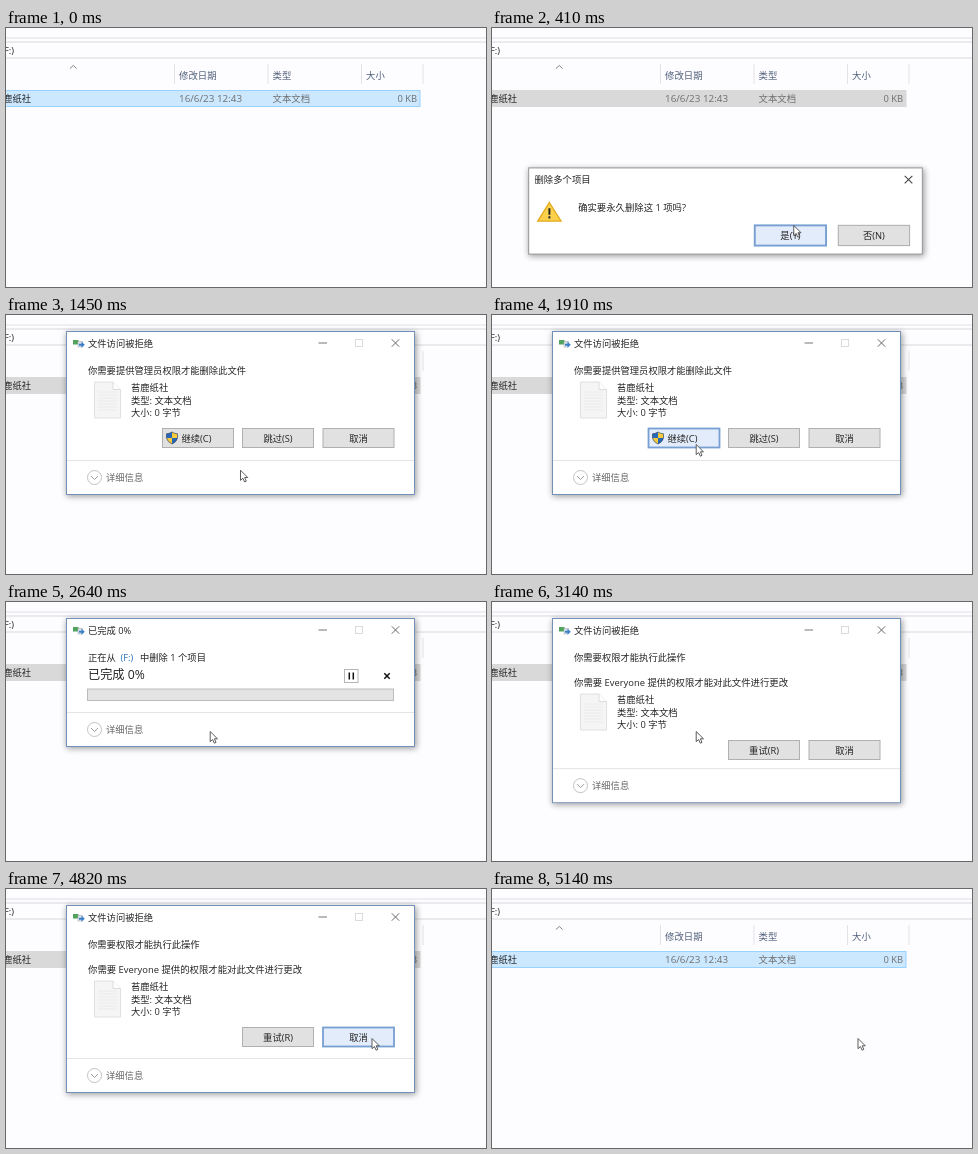
Write an HTML page that moves like this. It is 480x259 px and loops after 5.19 s.

```html
<!DOCTYPE html>
<html lang="zh-CN">
<head>
<meta charset="utf-8">
<title>删除文件</title>
<style>
html, body { margin: 0; width: 100%; height: 100%; overflow: hidden; background: #fdfcff; }
#stage { display: block; width: 100vw; height: 100vh; }
text { font-family: "Open Sans", "Noto Sans CJK SC", "Noto Sans CJK", sans-serif; white-space: pre; }
.client { overflow: hidden; }
</style>
</head>
<body>
<svg id="stage" viewBox="0 0 480 259"></svg>
<script>
const LOOP = 5190;
const FILE_NAME = '苔鹿纸社';
const INK = '#242424';
const TOP = 16.5;

const text = (x, y, content, { size = 9.3, fill = INK, anchor = 'start' } = {}) =>
  `<text x="${x}" y="${y}" font-size="${size}" fill="${fill}" text-anchor="${anchor}">${content}</text>`;

const rect = (x, y, w, h, fill, stroke = 'none', extra = '') =>
  `<rect x="${x}" y="${y}" width="${w}" height="${h}" fill="${fill}" stroke="${stroke}" ${extra}/>`;

const path = (d, stroke, width = 1, fill = 'none') =>
  `<path d="${d}" fill="${fill}" stroke="${stroke}" stroke-width="${width}"/>`;

const cross = (x, y, r, stroke, width) =>
  path(`M${x - r} ${y - r}l${2 * r} ${2 * r}m0 ${-2 * r}l${-2 * r} ${2 * r}`, stroke, width);

const button = (x, y, w, h, label, size, labelX = x + w / 2) =>
  `<g class="button" data-box="${x},${y},${w},${h}">${rect(x, y, w, h, '#e1e1e1', '#b0b0b0')}` +
  text(labelX, y + h / 2 + 3.6, label, { size, anchor: 'middle' }) + '</g>';

const panel = (x, y, w, h, border) =>
  rect(x, y + 1, w + 2, h + 1, '#000', 'none', 'class="shade" opacity=".38" filter="url(#blur)"') +
  rect(x, y, w, h, '#fff', border, 'class="frame"');

const shield = (x, y) => `<g transform="translate(${x} ${y})">` +
  path('M0-6Q-2.6-4.3-5.5-4.2V0H0ZM5.5 0Q4.6 4 0 6V0Z', 'none', 0, '#2767b5') +
  path('M0-6Q2.6-4.3 5.5-4.2V0H0ZM-5.5 0Q-4.6 4 0 6V0Z', 'none', 0, '#f7cb3c') +
  path('M0-6Q2.6-4.3 5.5-4.2V0Q4.6 4 0 6Q-4.6 4-5.5 0V-4.2Q-2.6-4.3 0-6Z', '#34496a', .7) + '</g>';

const pageIcon = y => path(`M88.5 ${y}h18.5l7.5 7.5v28.5h-26z`, '#e0e0e0', 1, '#f5f5f5') +
  path(`M107 ${y}v7.5h7.5`, '#dcdcdc', 1, '#fff') +
  path([10, 13, 16, 19, 22, 25, 28].map(d => `M92 ${y + d}h19`).join(''), '#e9e9e9', .8);

const fileInfo = y => pageIcon(y) +
  text(125, y + 9.3, FILE_NAME) +
  text(125, y + 21.7, '类型: 文本文档') +
  text(125, y + 33.7, '大小: 0 字节');

// The footer is drawn at y = 0 and moved with the window height.
const footer = '<g class="footer">' + rect(61, 0, 347, 34, '#fff') + path('M61 0H408', '#e4e4e4') +
  '<circle cx="88.5" cy="17" r="7" fill="#fff" stroke="#b4b4b4" stroke-width=".8"/>' +
  path('M85 15.5l3.5 3.5 3.5-3.5', '#909090', .9) +
  text(100, 20.5, '详细信息', { fill: '#666' }) + '</g>';

const taskWindow = (title, content) => panel(60.5, TOP, 348, 0, '#7290b8') +
  '<svg class="client" width="480">' +
  rect(67, 25, 5.5, 4.5, '#4fa35a') +
  rect(72, 26.5, 4.5, 5.5, '#dfe4ea', '#a3aebb', 'stroke-width=".6"') +
  path('M73 28.7h2.5v-2l3.3 3-3.3 3v-2H73z', 'none', 0, '#3b80c6') +
  text(82, 31.5, title) +
  path('M312.5 28h8.5', '#777') +
  rect(349.5, 24.5, 7, 7, 'none', '#d8d8d8', 'stroke-width=".9"') +
  cross(389.5, 28, 3.7, '#666', 1) +
  content + footer + '</svg>';

const confirmDialog = panel(48.5, 142.5, 370, 81, '#9a9a9a') +
  text(54, 156.8, '删除多个项目', { size: 8.8 }) +
  cross(405.5, 153.5, 3.6, '#444', 1) +
  path('M68 175L79 192.5H57Z', '#e2a91c', 1.2, '#fbd04a') +
  path('M68 180.5v6m0 1.5v2', '#222', 1.8) +
  text(95, 183.3, '确实要永久删除这 1 项吗?', { size: 8.8 }) +
  button(261, 196.5, 67, 19, '是(Y)', 8.8) +
  button(339.5, 196.5, 67, 19, '否(N)', 8.8);

const adminDialog = taskWindow('文件访问被拒绝',
  text(82, 58.6, '你需要提供管理员权限才能删除此文件') + fileInfo(67) +
  button(156.5, 113.5, 71, 19, '继续(C)', 9.3, 190.5) + shield(166, 123) +
  button(236.5, 113.5, 71, 19, '跳过(S)') +
  button(317, 113.5, 71, 19, '取消'));

const progressDialog = taskWindow('已完成 0%',
  text(82, 59, '正在从') + text(114.5, 59, '(F:)', { fill: '#2672b8' }) +
  text(134, 59, '中删除 1 个项目') +
  text(82, 76.6, '已完成 0%', { size: 12.2 }) +
  rect(338.5, 67.5, 13.5, 13, '#fff', '#b5b5b5') +
  path('M343.3 70.5v7m4 0v-7', '#111', 1.5) +
  cross(381, 74, 2.7, '#111', 1.5) +
  rect(81.5, 87, 306, 11.5, '#e4e4e4', '#bcbcbc'));

const deniedDialog = taskWindow('文件访问被拒绝',
  text(82, 58.8, '你需要权限才能执行此操作') +
  text(82, 83.7, '你需要 Everyone 提供的权限才能对此文件进行更改', { size: 9.4 }) + fileInfo(92) +
  button(236.5, 138.5, 71, 19, '重试(R)') +
  button(317, 138.5, 71, 19, '取消'));

const header = { fill: '#50607a', size: 9.4 };
const muted = { fill: '#6d6d6d', size: 9.4 };
const explorer = rect(0, 0, 480, 259, '#fdfcff') +
  path('M0 10H480', '#e0dfe4') +
  path('M0 14H480M0 30H480', '#d8d7dc') +
  text(8, 25.8, '(F:)', { anchor: 'end' }) +
  path('M64 40.5l3.3-3 3.3 3', '#777', .9) +
  path('M168.5 36v20M262 36v20M355.5 36v20M417 36v20', '#e3e2e7') +
  text(173, 50.5, '修改日期', header) + text(266.5, 50.5, '类型', header) + text(360, 50.5, '大小', header) +
  rect(-5, 62.5, 419, 16, '#cce8ff', '#99d1ff', 'id="row"') +
  text(25, 74, FILE_NAME, { anchor: 'end' }) +
  text(173, 74, '16/6/23 12:43', { ...muted, size: 9.85 }) +
  text(266.5, 74, '文本文档', muted) +
  text(411, 74, '0 KB', { ...muted, anchor: 'end' });

// Opening and closing fades carry a slight zoom; task windows glide from one height to the next.
const dialogs = [
  { markup: confirmDialog, cx: 233.5, cy: 183, base: 1.064, from: 120, open: 180, to: 1100, close: 150 },
  { markup: adminDialog, cx: 234.5, cy: 98, base: 1, from: 1080, open: 180, to: 2400, close: 0, heights: [163, 163] },
  { markup: progressDialog, cx: 234.5, cy: 81, base: 1, from: 2400, open: 0, to: 2950, close: 0, heights: [163, 128] },
  { markup: deniedDialog, cx: 234.5, cy: 109, base: 1, from: 2950, open: 0, to: 5100, close: 200, heights: [128, 187] }
];
const RESIZE = 245;

const stage = document.getElementById('stage');
stage.innerHTML = `<defs><filter id="blur" x="-10%" y="-20%" width="120%" height="140%">
  <feGaussianBlur stdDeviation="3.2"/></filter></defs>` + explorer +
  dialogs.map(d => `<g class="dialog">${d.markup}</g>`).join('') +
  `<g id="cursor">${path('M0 0V10.2L2.4 8L4.1 11.7L5.8 10.9L4.2 7.3H7.3Z', '#4a4a4a', .9, '#fff')}</g>`;

const row = document.getElementById('row');
const cursor = document.getElementById('cursor');
stage.querySelectorAll('.dialog').forEach((node, i) => {
  const d = dialogs[i];
  d.node = node;
  for (const part of ['shade', 'frame', 'client', 'footer']) d[part] = node.querySelector('.' + part);
  d.buttons = [...node.querySelectorAll('.button')].map(b => ({
    face: b.firstElementChild, box: b.dataset.box.split(',').map(Number)
  }));
});

const clamp = v => Math.max(0, Math.min(1, v));
const ease = p => p * p * (3 - 2 * p);
const easeOut = p => 1 - (1 - p) ** 2;
const mix = (a, b, p) => a + (b - a) * p;
const between = (t, a, b) => t >= a && t < b;

// time, x, y
const cursorPath = [
  [100, 330, 176], [560, 292.5, 204.5], [1160, 292.5, 204.5], [1640, 204.2, 129.5],
  [3320, 204.2, 129.5], [3800, 353.7, 153.5], [4420, 353.7, 153.5], [4800, 366, 149.5]
];

function cursorAt(t) {
  const next = cursorPath.findIndex(k => k[0] > t);
  if (next < 1) return cursorPath.at(next).slice(1);
  const [a, b] = [cursorPath[next - 1], cursorPath[next]];
  const p = ease((t - a[0]) / (b[0] - a[0]));
  return [mix(a[1], b[1], p), mix(a[2], b[2], p)];
}

function resize(d, t) {
  const height = mix(...d.heights, easeOut(clamp((t - d.from) / RESIZE)));
  d.frame.setAttribute('height', height);
  d.shade.setAttribute('height', height + 1);
  d.client.setAttribute('height', TOP + height - .5);
  d.footer.setAttribute('transform', `translate(0 ${TOP + height - 34})`);
}

function drawDialog(d, t, [x, y], pressed) {
  const visible = between(t, d.from, d.to);
  d.node.style.display = visible ? '' : 'none';
  if (!visible) return;
  if (d.heights) resize(d, t);
  const opened = d.open ? ease(clamp((t - d.from) / d.open)) : 1;
  const left = d.close ? clamp((d.to - t) / d.close) : 1;
  const amount = Math.min(opened, left);
  const scale = d.base * (1 - .09 * (1 - amount));
  d.node.setAttribute('opacity', amount);
  d.node.setAttribute('transform',
    `translate(${d.cx} ${d.cy}) scale(${scale}) translate(${-d.cx} ${-d.cy})`);
  for (const { face, box: [bx, by, w, h] } of d.buttons) {
    const hover = between(x, bx, bx + w) && between(y, by, by + h);
    face.setAttribute('fill', hover ? (pressed ? '#cce0f5' : '#e3ecfa') : '#e1e1e1');
    face.setAttribute('stroke', hover ? '#779fd2' : '#b0b0b0');
    face.setAttribute('stroke-width', hover ? 1.8 : 1);
  }
}

function draw(t) {
  const active = t < 120 || between(t, 950, 1120) || t >= 4900;
  row.setAttribute('fill', active ? '#cce8ff' : '#d9d9d9');
  row.setAttribute('stroke', active ? '#99d1ff' : '#d9d9d9');
  const point = cursorAt(t);
  const pressed = between(t, 820, 940) || between(t, 2130, 2270) || between(t, 4200, 4340);
  dialogs.forEach(d => drawDialog(d, t, point, pressed));
  cursor.style.display = t < 100 ? 'none' : '';
  cursor.setAttribute('transform', `translate(${point[0]} ${point[1]})`);
}

const start = performance.now();
function tick() {
  draw((performance.now() - start) % LOOP);
  requestAnimationFrame(tick);
}
tick();
</script>
</body>
</html>
```
